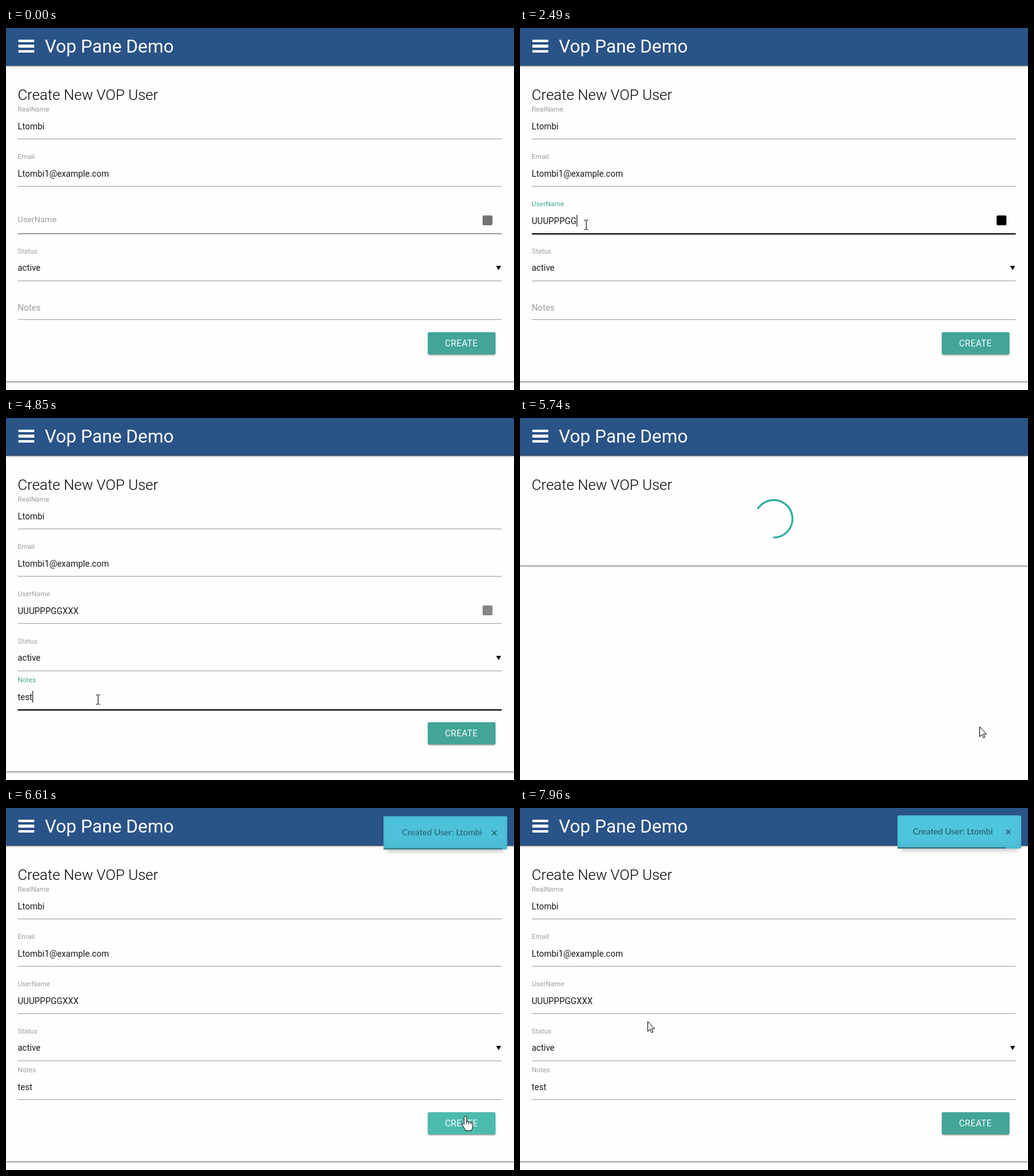
These frames come from a looping animation (825x589 px, 8 s). An HTML page:

```html
<!DOCTYPE html>
<html lang="en">
<head>
<meta charset="utf-8">
<title>Create user form</title>
<style>
  html, body { margin: 0; width: 825px; height: 589px; overflow: hidden; background: #fefefe; }
  body { position: relative; font: 14px/20px Roboto, sans-serif; color: rgba(0,0,0,.9); --teal: #43a899; --grey: #9e9e9e; }
  body * { position: absolute; box-sizing: border-box; white-space: pre; }
  .anim, .anim * { animation: 8s linear infinite; }

  header { left: 0; top: 0; width: 825px; height: 61px; background: #2a5387; color: #fff; z-index: 1;
    box-shadow: 0 1px 1px rgba(0,0,0,.5), 0 2px 3px rgba(0,0,0,.16); }
  header b { left: 20px; width: 25.5px; height: 4.5px; border-radius: 1px; background: #fff; }
  header span { left: 63px; top: 13px; font-size: 29.4px; line-height: 34px; }

  #card { left: 0; top: 61px; width: 825px; height: 514px; background: #fefefe; animation-name: card;
    box-shadow: 0 1px 1px rgba(0,0,0,.42), 0 2px 3px rgba(0,0,0,.16); }
  h1 { margin: 0; left: 19px; top: 95px; font-size: 24px; line-height: 28px; font-weight: 300; color: #000; }
  #form { inset: 0; animation-name: form; }
  label { left: 19px; font-size: 11.2px; color: var(--grey); }
  .value { left: 19px; }
  .value * { position: static; }
  .line { left: 19px; width: 786px; height: 1px; background: var(--grey); }
  .caret { display: inline-block; vertical-align: top; height: 19px; border-left: 1px solid #000; margin-right: -1px; }
  #userLabel { top: 305px; font-size: 14px; animation-name: userLabel; }
  #notesLabel { top: 445px; font-size: 14px; animation-name: notesLabel; }
  #userLine { animation-name: userLine; }
  #notesLine { animation-name: notesLine; }
  #badge { left: 774px; top: 305px; width: 16px; height: 16px; border-radius: 2px; animation-name: badge; }
  #arrow { left: 796px; top: 387px; width: 8px; height: 7px; background: #000; clip-path: polygon(0 0, 100% 0, 50% 100%); }
  #create { left: 685px; top: 495px; width: 110px; height: 36px; padding-left: 28px; border-radius: 2px;
    line-height: 36px; letter-spacing: .5px; color: #fff; animation-name: create;
    box-shadow: 0 2px 2px rgba(0,0,0,.14), 0 1px 5px rgba(0,0,0,.12), 0 3px 1px -2px rgba(0,0,0,.2); }

  #wait { left: 380px; top: 132px; width: 64px; height: 64px; animation-name: wait; }
  #wait circle { fill: none; stroke: #26a69a; stroke-width: 3; transform-origin: 32px 32px;
    animation: turn 1.6s linear infinite, grow 1.6s ease-in-out infinite; }

  #toast { left: 613px; top: 12px; width: 201px; height: 54px; border-radius: 2px; background: #4fc5dd; z-index: 2;
    font-family: Lato, sans-serif; color: rgba(0,0,0,.6); animation-name: toast;
    box-shadow: inset 0 -10px 20px -10px rgba(0,0,0,.12), inset 0 0 5px rgba(0,0,0,.06), 0 8px 8px -5px rgba(0,0,0,.25); }
  #toast span { left: 25px; top: 16px; animation-name: message; }
  #toast svg { left: 176px; top: 23px; width: 8px; height: 8px; stroke: rgba(0,0,0,.6); stroke-width: 1.3; }
  #bar { left: 0; bottom: 0; width: 201px; height: 2px; background: rgba(0,0,0,.4); transform-origin: 0 0; animation-name: bar; }

  #cursor { left: 0; top: 0; width: 1px; height: 1px; overflow: visible; z-index: 3; animation-name: move; }
  #cursor g { fill: #fff; stroke: #000; stroke-linejoin: round; opacity: 0; animation-timing-function: step-end; }
  #pointer { animation-name: pointer; }
  #beam { animation-name: beam; }
  #hand { animation-name: hand; }

  @keyframes card { 0%, 71.12% { height: 514px } 71.13%, 75.6% { height: 179px } 75.61%, 100% { height: 514px } }
  @keyframes form { 0%, 71.12% { opacity: 1 } 71.13%, 75.6% { opacity: 0 } 75.61%, 100% { opacity: 1 } }
  @keyframes wait { 0%, 71.12% { opacity: 0 } 71.13%, 75.6% { opacity: 1 } 75.61%, 100% { opacity: 0 } }
  @keyframes turn { to { transform: rotate(360deg) } }
  @keyframes grow { 0%, 100% { stroke-dasharray: 12 200 } 50% { stroke-dasharray: 135 200 } }

  @keyframes userLabel {
    0% { transform: translateY(-3px); font-size: 13.4px; color: var(--grey) }
    .6%, 5.2% { transform: none; font-size: 14px; color: var(--grey); animation-timing-function: ease-out }
    7.7%, 54.1% { transform: translateY(-28px); font-size: 11.2px; color: var(--teal) }
    56.6%, 100% { transform: translateY(-28px); font-size: 11.2px; color: var(--grey) }
  }
  @keyframes notesLabel {
    0%, 54.1% { transform: none; font-size: 14px; color: var(--grey); animation-timing-function: ease-out }
    56.6%, 70.5% { transform: translateY(-28px); font-size: 11.2px; color: var(--teal) }
    71.1%, 100% { transform: translateY(-28px); font-size: 11.2px; color: var(--grey) }
  }
  @keyframes userLine {
    0% { background: #6b6b6b; box-shadow: 0 1px rgba(0,0,0,.15) }
    .8%, 5.2% { background: #9e9e9e; box-shadow: 0 1px transparent; animation-timing-function: ease-out }
    8%, 54.1% { background: #000; box-shadow: 0 1px #000 }
    57.5%, 100% { background: #9e9e9e; box-shadow: 0 1px transparent }
  }
  @keyframes notesLine {
    0%, 54.1% { background: #9e9e9e; box-shadow: 0 1px transparent; animation-timing-function: ease-out }
    57.5%, 70.5% { background: #000; box-shadow: 0 1px #000 }
    73%, 100% { background: #9e9e9e; box-shadow: 0 1px transparent }
  }
  @keyframes badge {
    0%, 5.2% { background: #737373; opacity: 1 }
    6.5%, 54.1% { background: #000 }
    56.6%, 71.12% { background: #858585; opacity: 1 }
    71.13%, 100% { background: #858585; opacity: 0 }
  }
  @keyframes create {
    0%, 64.4% { background: #42a598; animation-timing-function: ease-out }
    68.1%, 71.12% { background: #4cbbae }
    71.13%, 76.2% { background: #42a598; animation-timing-function: ease-out }
    80%, 83.5% { background: #4cbbae; animation-timing-function: ease-out }
    87.2%, 100% { background: #42a598 }
  }
  @keyframes toast {
    0%, 75.69% { opacity: 0; transform: translateY(54px); animation-timing-function: ease }
    84.44%, 100% { opacity: 1; transform: none }
  }
  @keyframes message {
    0%, 77.25% { opacity: 0; transform: translateX(50px); animation-timing-function: cubic-bezier(.16,.81,.32,1) }
    89.75%, 100% { opacity: 1; transform: none }
  }
  /* the countdown pauses while the mouse rests on the toast */
  @keyframes bar {
    0%, 80.125% { transform: none }
    86.375%, 97.875% { transform: scaleX(.9) }
    100% { transform: scaleX(.866) }
  }
  @keyframes move {
    0%, .375% { transform: translate(250px,546px); animation-timing-function: ease-out }
    5%, 49% { transform: translate(107px,320px); animation-timing-function: ease-in-out }
    53.5%, 61% { transform: translate(149px,458px); animation-timing-function: ease-in }
    64.5% { transform: translate(690px,520px); animation-timing-function: ease-out }
    66.5%, 83% { transform: translate(746px,502px); animation-timing-function: cubic-bezier(.15,.75,.25,1) }
    90.25%, 95.9% { transform: translate(775px,49px); animation-timing-function: ease-in-out }
    99.5%, 100% { transform: translate(207px,347px) }
  }
  @keyframes pointer {
    0% { opacity: 0 } .375% { opacity: 1 } 4% { opacity: 0 } 50% { opacity: 1 } 52.5% { opacity: 0 }
    62% { opacity: 1 } 64.4% { opacity: 0 } 71.13% { opacity: 1 } 75.61% { opacity: 0 } 83.5%, 100% { opacity: 1 }
  }
  @keyframes beam {
    0% { opacity: 0 } 4% { opacity: 1 } 50% { opacity: 0 } 52.5% { opacity: 1 } 62%, 100% { opacity: 0 }
  }
  @keyframes hand {
    0% { opacity: 0 } 64.4% { opacity: 1 } 71.13% { opacity: 0 } 75.61% { opacity: 1 } 83.5%, 100% { opacity: 0 }
  }
</style>
</head>
<body class="anim">
  <header>
    <b style="top:18.5px"></b><b style="top:27.2px"></b><b style="top:35.9px"></b>
    <span>Vop Pane Demo</span>
  </header>

  <div id="card"></div>
  <h1>Create New VOP User</h1>
  <div id="form">
    <label style="top:123px">RealName</label>
    <div class="value" style="top:150px">Ltombi</div>
    <div class="line" style="top:180px"></div>

    <label style="top:200px">Email</label>
    <div class="value" style="top:227px">Ltombi1@example.com</div>
    <div class="line" style="top:257px"></div>

    <label id="userLabel">UserName</label>
    <div class="value" id="user" style="top:304px"><span></span><i class="caret"></i></div>
    <div id="badge"></div>
    <div class="line" id="userLine" style="top:334px"></div>

    <label style="top:354px">Status</label>
    <div class="value" style="top:380px">active</div>
    <div id="arrow"></div>
    <div class="line" style="top:411px"></div>

    <label id="notesLabel">Notes</label>
    <div class="value" id="notes" style="top:444px"><span></span><i class="caret"></i></div>
    <div class="line" id="notesLine" style="top:474px"></div>

    <div id="create">CREATE</div>
  </div>

  <svg id="wait" viewBox="0 0 64 64"><circle cx="32" cy="32" r="30.5"/></svg>

  <div id="toast">
    <span>Created User: Ltombi</span>
    <svg viewBox="0 0 8 8"><path d="M0 0 8 8M8 0 0 8"/></svg>
    <div id="bar"></div>
  </div>

  <svg id="cursor">
    <g id="pointer"><path d="M.5 .5V16.5L4.2 13 6.7 18.6 9 17.6 6.6 12.1H11.6Z"/></g>
    <g id="beam"><path fill="none" d="M-3 -7.5H-1L.5 -6.5 2 -7.5H4M.5 -6.5V7M-3 8H-1L.5 7 2 8H4"/></g>
    <g id="hand">
      <path d="M-2 1.5a2 2 0 0 1 4 0V8.5a2 2 0 0 1 3.6.8 2 2 0 0 1 3.4 .9 1.8 1.8 0 0 1 3 1.6V16c0 4-2 4.5-2 7H0c0-2.5-2-4-3-6l-2.3-4c-1-2 1-3 2.1-1.7L-2 13z"/>
      <path fill="none" d="M2 8V12M5.6 9.5V12.5M9 10.5V13"/>
    </g>
  </svg>

<script>
  const LOOP = 8000, BLINK = 530;
  const fields = [
    { id: 'user', text: 'UUUPPPGGXXX', focus: 430, blur: 4330,
      keys: [1190, 1340, 1520, 1750, 1930, 2080, 2310, 2490, 2720, 2900, 3100] },
    { id: 'notes', text: 'test', focus: 4330, blur: 5640, keys: [4580, 4690, 4770, 4830] },
  ];
  for (const f of fields) [f.label, f.caret] = document.getElementById(f.id).children;

  function draw(t) {
    for (const { text, focus, blur, keys, label, caret } of fields) {
      const count = keys.filter(k => k <= t).length;
      const last = count ? keys[count - 1] : focus;
      const on = t >= focus && t < blur && (t - last) % (2 * BLINK) < BLINK;
      label.textContent = text.slice(0, count);
      caret.style.visibility = on ? 'visible' : 'hidden';
    }
  }

  let start;
  function tick(now) {
    start ??= now;
    draw((now - start) % LOOP);
    requestAnimationFrame(tick);
  }
  draw(0);
  requestAnimationFrame(tick);
</script>
</body>
</html>
```
